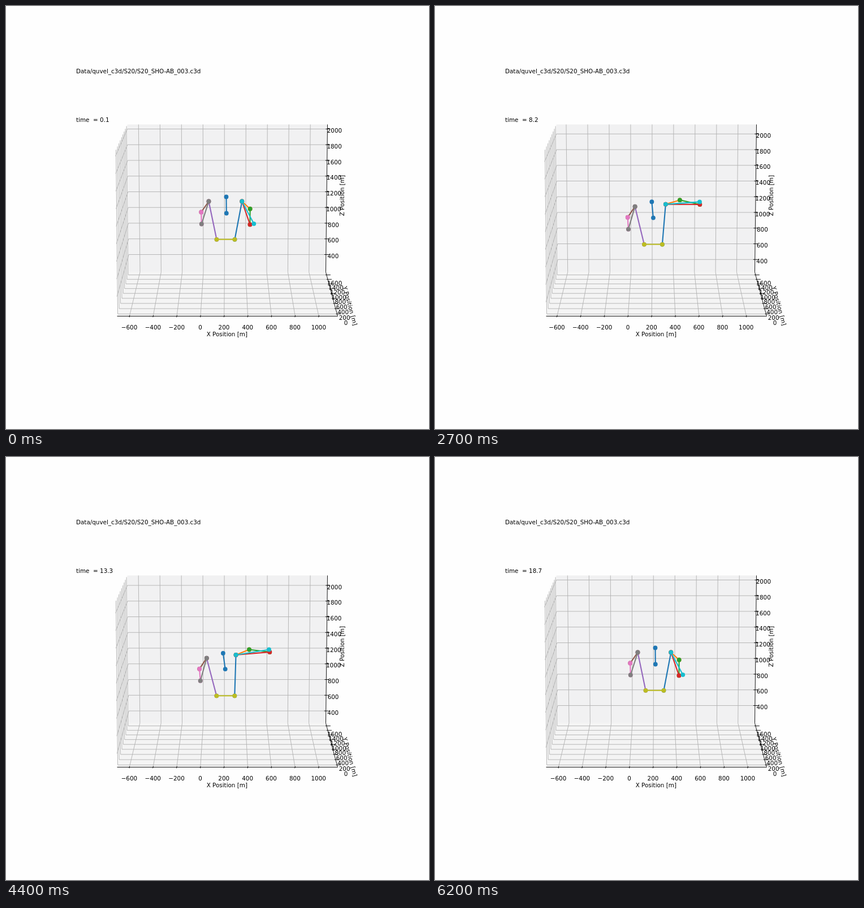
An HTML page with a canvas for the animation above (6300 ms loop, 748 by 748 pixels).

```html
<!DOCTYPE html>
<html lang="en">
<head>
<meta charset="utf-8">
<style>
  html, body { margin: 0; width: 100%; height: 100%; overflow: hidden; background: #fefefe; }
  canvas { display: block; }
</style>
</head>
<body>
<canvas width="748" height="748"></canvas>
<script>
const ctx = document.querySelector('canvas').getContext('2d');
const FRAMES = 63, STEP = 100;
const GRID = '#b0b0b0', INK = '#000';
const X_STEP = 41.85, Z_STEP = 27.75, Z_ASPECT = 1.5;
const RAD = Math.PI / 180, REST_ANGLE = -77, SWING = 153;

// Bones in painting order; each colours its own line and both end dots.
const bones = [
  ['hipR', 'shoulderR', '#1f77b4'], ['shoulderR', 'elbowR', '#ff7f0e'],
  ['elbowR', 'handR', '#2ca02c'], ['handR', 'shoulderR', '#d62728'],
  ['hipL', 'shoulderL', '#9467bd'], ['shoulderL', 'elbowL', '#8c564b'],
  ['elbowL', 'handL', '#e377c2'], ['handL', 'shoulderL', '#7f7f7f'],
  ['hipL', 'hipR', '#bcbd22'], ['shoulderR', 'thumbR', '#17becf'],
  ['head', 'neck', '#1f77b4']];

function ease(t) {
  t = Math.min(1, Math.max(0, t));
  return t * t * (3 - 2 * t);
}

// 0 with the arm hanging, 1 fully raised; it swings slightly past rest on the way back.
function lift(k) {
  return ease((k - 18) / 18) - ease((k - 36.4) / 16.3) - 0.033 * Math.exp(-(((k - 55) / 3) ** 2));
}

// The view follows the body centre, so the axes drift as the arm swings.
function view(k) {
  const s = lift(k), angle = REST_ANGLE + SWING * s;
  const reach = Math.cos(angle * RAD) - Math.cos(REST_ANGLE * RAD);
  return { x0: 343.4 + 10.5 * lift(k - 1) - 9 * reach, dz: 19.5 * s - 4 * s * s };
}

function bodyAt(k, { x0, dz }) {
  const s = lift(k), lean = lift(k - 1), angle = REST_ANGLE + SWING * s;
  const at = (x, y) => [x0 + x, dz + y];
  const from = ([x, y], dx, dy) => [x + dx, y + dy];
  const polar = (origin, degrees, length) =>
    from(origin, length * Math.cos(degrees * RAD), -length * Math.sin(degrees * RAD) / Z_ASPECT);

  const shoulderL = at(14.6 - 5.5 * lean, 345 + lean);
  const shoulderR = at(73.4 - 16.5 * lean, 345 - 6 * Math.sin(lean * Math.PI / 2));
  const armLength = 63 - 5 * s;
  return {
    head: at(45.6 - 8.5 * lean, 337),
    neck: at(45.9 - 3 * lean, 366 - 1.5 * lean),
    hipL: at(28.6, 412.3),
    hipR: at(60.6, 412.3),
    shoulderL,
    elbowL: from(shoulderL, -13.3 + lean, 19),
    handL: from(shoulderL, -12.7 + 2.5 * lean, 40),
    shoulderR,
    elbowR: polar(shoulderR, angle + 23 + 16 * s - 26 * s * s, 23.5 + 4 * Math.cos(angle * RAD)),
    handR: polar(shoulderR, angle, armLength),
    thumbR: polar(shoulderR, angle + 6.5, armLength)
  };
}

function trace(points) {
  ctx.beginPath();
  points.forEach(([x, y]) => ctx.lineTo(x, y));
}

function line(points, color, width = 0.9) {
  trace(points);
  ctx.strokeStyle = color;
  ctx.lineWidth = width;
  ctx.stroke();
}

function fill(points, color) {
  trace(points);
  ctx.fillStyle = color;
  ctx.fill();
}

function text(str, x, y, align = 'center', angle = 0) {
  ctx.save();
  ctx.translate(x, y);
  ctx.rotate(angle * RAD);
  ctx.textAlign = align;
  ctx.fillStyle = INK;
  ctx.fillText(str, 0, 3.8);
  ctx.restore();
}

function drawAxes({ x0, dz }) {
  fill([[214, 209], [193, 256], [196, 548], [217, 470]], '#f9f9f9');
  fill([[214, 209], [568, 209], [565, 470], [217, 470]], '#f1f1f2');
  fill([[217, 470], [565, 470], [586, 548], [196, 548]], '#f4f4f4');

  const ticks = [];
  for (let j = 0; j < 9; j++) {
    const x = x0 + (j - 3) * X_STEP, f = (x - 196) / 390;
    const y = 475 + 7.7 * j + 0.117 * j * j, t = 21 * (y - 470) / 78;
    const z = 217 + dz + j * Z_STEP, g = (z - 209) / 261;
    line([[214 + 354 * f, 209], [217 + 348 * f, 470], [x, 548]], GRID);
    line([[214 - t, 209 + 47 * t / 21], [217 - t, y], [565 + t, y]], GRID);
    line([[193 + 3 * g, 256 + 292 * g], [214 + 3 * g, z], [568 - 3 * g, z]], GRID);
    ticks.push({ x, y, yx: 565 + t, z, zx: 568 - 3 * g });
  }

  line([[196, 548], [586, 548], [565, 470], [568, 209]], INK);
  ticks.forEach(({ x, y, yx, z, zx }, j) => {
    line([[x + 0.4, 546.5], [x - 0.4, 550]], INK);
    line([[yx - 2, y], [yx + 7, y]], INK);
    line([[zx - 3, z], [zx + 5, z]], INK);
    text(String((j - 3) * 200).replace('-', '−'), x - 0.3, 567.3);
    text(1600 - j * 200, 580.6 + 2.5 * j, y + 15 + j * 0.1);
    text(2000 - j * 200, zx + 12.5, z + 2.8);
  });

  text('X Position [m]', 390.3, 579.8);
  text('Y Position [m]', 608, 529.7, 'center', 75);
  text('Z Position [m]', 593.5, 334.7, 'center', -90);
}

function drawBody(body) {
  for (const [a, b, color] of bones) {
    line([body[a], body[b]], color, 2.1);
    ctx.fillStyle = color;
    for (const [x, y] of [body[a], body[b]]) {
      ctx.beginPath();
      ctx.arc(x, y, 3.9, 0, 2 * Math.PI);
      ctx.fill();
    }
  }
}

function draw(now) {
  const k = Math.floor(now / STEP) % FRAMES, axes = view(k);
  ctx.fillStyle = '#fefefe';
  ctx.fillRect(0, 0, 748, 748);
  ctx.font = '10.39px "DejaVu Sans", sans-serif';
  text('Data/quvel_c3d/S20/S20_SHO-AB_003.c3d', 124, 115.3, 'left');
  text('time  = ' + (0.1 + 0.3 * k).toFixed(1), 124, 201.5, 'left');

  // Half a pixel puts the thin lines on pixel centres.
  ctx.save();
  ctx.translate(0.5, 0.5);
  drawAxes(axes);
  drawBody(bodyAt(k, axes));
  ctx.restore();
  requestAnimationFrame(draw);
}
draw(performance.now());
</script>
</body>
</html>
```
